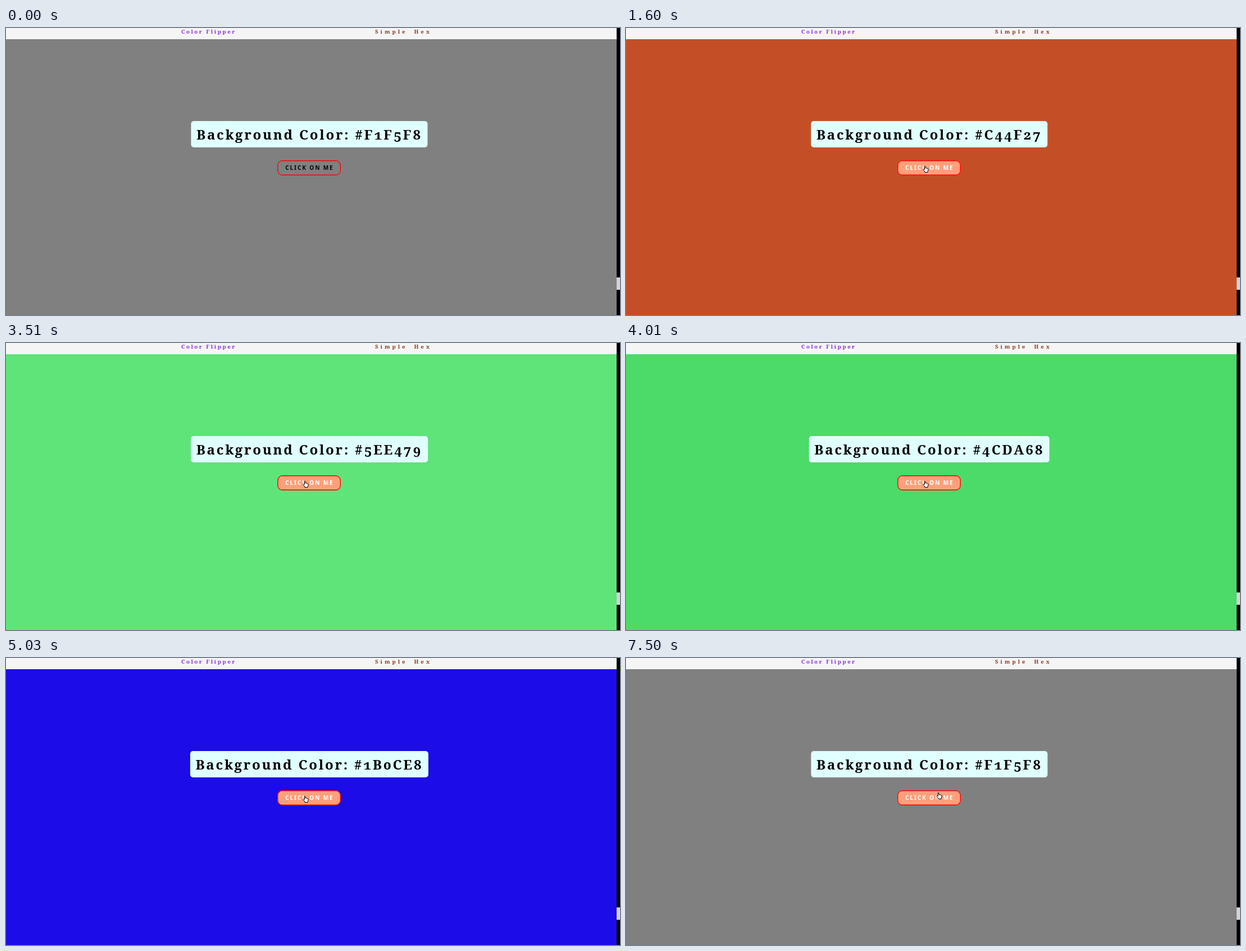
An HTML page that plays this animation: 1093x512 px, repeating every 8000 ms.

```html
<!DOCTYPE html>
<html lang="en">
<head>
<meta charset="utf-8">
<title>Color flipper</title>
<style>
html, body { margin: 0; width: 100%; height: 100%; overflow: hidden; }
body { position: relative; font-family: Georgia, Gelasio, "Noto Serif", serif; font-weight: bold; }
body > * { position: absolute; box-sizing: border-box; white-space: pre; }
nav { left: 0; top: 0; width: 1087px; height: 20px; background: whitesmoke; font-size: 9.6px; }
nav span { position: absolute; top: 0; line-height: 13px; }
#brand { left: 312px; letter-spacing: 2.55px; color: blueviolet; }
#simple, #hex { letter-spacing: 4px; color: #8b3a1e; }
#simple { left: 657px; }
#hex { left: 726.5px; }
#simple.hover { color: #d99a2b; }
h1 { left: 540px; top: 166px; height: 47px; margin: 0; padding: 0 9.6px; transform: translateX(-50%);
  border-radius: 5px; background: lightcyan; color: #000; font-size: 24px; line-height: 47px;
  letter-spacing: 2.77px; font-variant-numeric: oldstyle-nums; }
#button { left: 483px; top: 236px; width: 113px; height: 27px; padding-left: 1.9px;
  border: 1px solid red; box-shadow: inset 0 0 0 .4px red; border-radius: 9px;
  font: bold 10px/25.5px "Noto Sans", "Open Sans", sans-serif; letter-spacing: 1.92px; text-align: center; }
#button.hover { background: lightsalmon; color: #fff; }
#track { left: 1087px; top: 0; width: 6px; height: 512px; background: #000; }
#thumb { left: 1087px; top: 445px; width: 6px; height: 22px; background: #d3d3d3; }
svg { left: 0; top: 0; overflow: visible; fill: #fff; stroke: #000; stroke-linejoin: round; }
</style>
</head>
<body>
<nav><span id="brand">Color Flipper</span><span id="simple">Simple</span><span id="hex">Hex</span></nav>
<h1 id="title"></h1>
<div id="button">CLICK ON ME</div>
<div id="track"></div>
<div id="thumb"></div>
<svg id="cursor" width="12" height="15"><path id="shape"/></svg>
<script>
const $ = id => document.getElementById(id);
const hand = "M3.5 7.5V1.6Q4.3 .2 5.1 1.6V5Q6.2 4.2 6.8 5.3Q7.9 4.6 8.5 5.7Q10 5.3 10 7V9L9 11V12.6H4V11L.7 7.6Q1.2 6 2.4 6.7Z";
const arrow = "M.5 .5V11L3 8.7L4.7 12.5L6.3 11.8L4.7 8H8Z";
const start = "F1F5F8";

// [start ms, hex, hovered element, cursor x, cursor y]
const scenes = [
  [0, start],
  [500, start, "button", 552, 239],
  [1000, start, "button", 528, 245],
  [1600, "C44F27", "button", 528, 245],
  [2510, "8F9A50", "button", 528, 245],
  [3510, "5EE479", "button", 528, 245],
  [4010, "4CDA68", "button", 528, 245],
  [4510, "39D158", "button", 528, 245],
  [5030, "1B0CE8", "button", 528, 245],
  [5520, "F090F3", "button", 528, 245],
  [6010, "F090F3", "simple", 677, 8],
  [6530, "F090F3", "simple", 675, 6.5],
  [7020, start, "", 626, 85],
  [7500, start, "button", 552, 239]
];

function draw(now) {
  const t = now % 8000;
  const [, hex, hovered, x, y] = scenes.findLast(s => s[0] <= t);
  document.body.style.background = hex === start ? "gray" : "#" + hex;
  $("title").textContent = "Background Color: #" + hex;
  for (const id of ["button", "simple"]) $(id).className = id === hovered ? "hover" : "";
  $("cursor").style.display = x ? "block" : "none";
  $("cursor").style.transform = `translate(${x}px, ${y}px)`;
  $("shape").setAttribute("d", hovered ? hand : arrow);
  requestAnimationFrame(draw);
}
requestAnimationFrame(draw);
</script>
</body>
</html>
```
